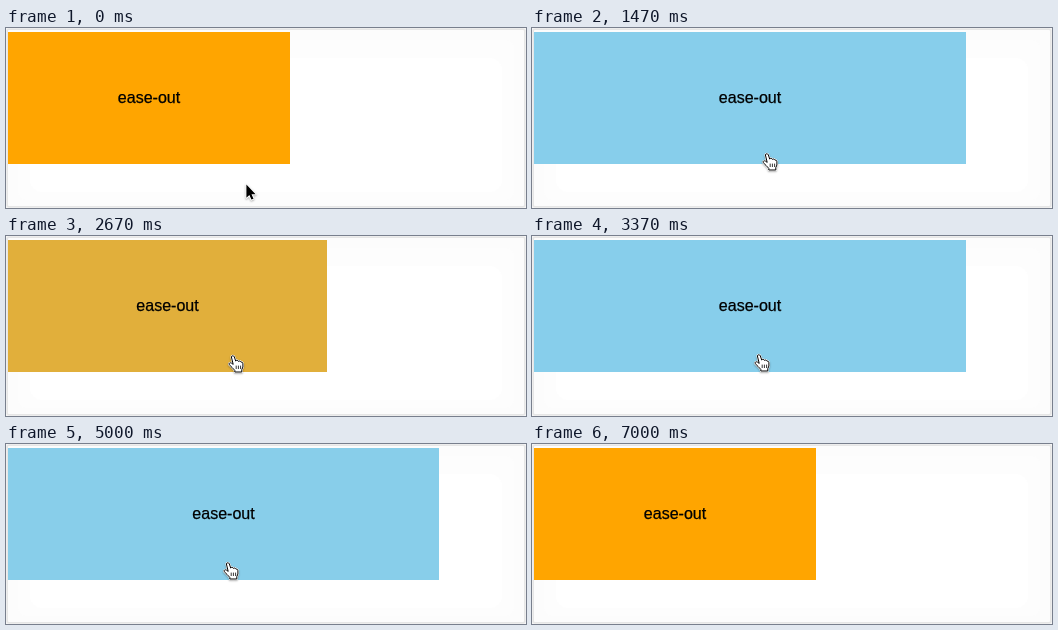
Animation of 520 by 180 pixels, one loop 7.16 s. Source, as an HTML page with a canvas:

```html
<!DOCTYPE html>
<html lang="en">
<head>
<meta charset="utf-8">
<title>ease-out</title>
<style>
html, body { margin: 0; width: 100%; height: 100%; overflow: hidden; background: #fff; }
canvas { display: block; width: 520px; height: 180px; }
</style>
</head>
<body>
<canvas id="stage"></canvas>
<script>
const LOOP = 7160, STEP = 100 / 3, FADE = 500, GLIDE = 220;
const BOX = { x: 2, y: 4, h: 132, small: 282, large: 432 };
const ORANGE = [255, 165, 0], SKY = [135, 206, 235];

// Each visit: when the pointer enters and leaves, where it hovers, where it rests after
const visits = [
  { enter: 507, leave: 1567, hover: [235, 126], rest: [233, 145] },
  { enter: 2587, leave: 3537, hover: [227, 119], rest: [227, 150] },
  { enter: 4529, leave: 5667, hover: [222, 119], rest: [220, 149] }
];
const HOME = [240, 156];
const EXIT = { at: 5900, length: 530, to: [222, 190] };

const canvas = document.getElementById('stage');
const ctx = canvas.getContext('2d');
const ratio = window.devicePixelRatio || 1;
canvas.width = 520 * ratio;
canvas.height = 180 * ratio;
ctx.scale(ratio, ratio);

const mix = (a, b, p) => a + (b - a) * p;
const clamp = p => Math.min(1, Math.max(0, p));
const smooth = p => p * p * (3 - 2 * p);

// cubic-bezier(0, 0, .58, 1), solved by bisection
function easeOut(x) {
  if (x <= 0 || x >= 1) return clamp(x);
  let lo = 0, hi = 1;
  for (let i = 0; i < 24; i++) {
    const s = (lo + hi) / 2;
    if (1.74 * s * s - 0.74 * s ** 3 < x) lo = s; else hi = s;
  }
  return smooth(lo);
}

// Only one visit is active at a time, so their shares add up
const growth = t => visits.reduce((sum, v) =>
  sum + easeOut((t - v.enter) / FADE) - easeOut((t - v.leave) / FADE), 0);

const isInside = t => visits.some(v => t >= v.enter && t < v.leave);

function pointerAt(t) {
  let spot = HOME;
  const glide = (to, start, length) => {
    const p = smooth(clamp((t - start) / length));
    spot = spot.map((c, i) => mix(c, to[i], p));
  };
  for (const v of visits) {
    glide(v.hover, v.enter - GLIDE / 2, GLIDE);
    glide(v.rest, v.leave - GLIDE / 2, GLIDE);
  }
  glide(EXIT.to, EXIT.at, EXIT.length);
  return spot.map(Math.round);
}

function roundRect(x, y, w, h, r, color) {
  ctx.fillStyle = color;
  ctx.beginPath();
  ctx.roundRect(x, y, w, h, r);
  ctx.fill();
}

function drawPage() {
  ctx.fillStyle = '#f6f6f6';
  ctx.fillRect(0, 0, 520, 180);
  roundRect(0.5, 0.5, 519, 179, 2, '#e6e6e6');
  roundRect(2, 2, 516, 176, 1, '#fcfcfc');
  roundRect(12, 12, 496, 160, 8, '#fdfdfd');
  roundRect(24, 30, 472, 134, 12, '#fff');
}

function drawBox(p) {
  const w = Math.round(mix(BOX.small, BOX.large, p));
  const rgb = ORANGE.map((c, i) => Math.round(mix(c, SKY[i], p)));
  ctx.fillStyle = `rgb(${rgb})`;
  ctx.fillRect(BOX.x, BOX.y, w, BOX.h);

  // The hairline stroke gives the slightly heavier screen weight
  ctx.fillStyle = ctx.strokeStyle = '#000';
  ctx.lineWidth = 0.25;
  ctx.font = '16px "Liberation Sans", Helvetica, Arial, sans-serif';
  ctx.textAlign = 'center';
  ctx.fillText('ease-out', BOX.x + w / 2, 75);
  ctx.strokeText('ease-out', BOX.x + w / 2, 75);
}

const arrow = new Path2D('M.4 .6V13.8L3.4 11L5.4 15.6L7.5 14.7L5.5 10.2H9.6Z');
const hand = new Path2D(
  'M-1.6 1C-1.6 -.5 .8 -.7 1.3 .8L2.7 5C3.3 4 5 4.2 5.4 5.4' +
  'C6.2 4.7 7.6 5 8 6.2C9 5.8 9.9 6.6 9.9 7.8V11L8.8 13.6V16H1.8V14.4' +
  'L-1 11.4L-3.8 8.6C-4.5 7.2 -2.8 6.2 -1.4 7.2L.2 8.4Z');
const fingers = new Path2D('M3.2 9.6V13M5.4 9.6V13M7.6 9.6V13');

function drawPointer([x, y], inside) {
  const shape = inside ? hand : arrow;
  ctx.save();
  ctx.translate(x, y);
  ctx.lineJoin = 'round';
  ctx.shadowColor = 'rgba(0,0,0,.3)';
  ctx.shadowBlur = 2 * ratio;
  ctx.shadowOffsetY = ratio;
  ctx.strokeStyle = '#fff';
  ctx.lineWidth = 2;
  ctx.stroke(shape);
  ctx.shadowColor = 'transparent';
  ctx.fillStyle = inside ? '#fff' : '#000';
  ctx.fill(shape);
  if (inside) {
    ctx.strokeStyle = '#000';
    ctx.lineWidth = 1;
    ctx.stroke(shape);
    ctx.lineWidth = 0.8;
    ctx.stroke(fingers);
  }
  ctx.restore();
}

function draw(now) {
  // The picture advances 30 times a second
  const t = Math.floor((now % LOOP + 4) / STEP) * STEP;
  drawPage();
  drawBox(growth(t));
  if (t < EXIT.at + EXIT.length) drawPointer(pointerAt(t), isInside(t));
}

let start = null;
function tick(now) {
  if (start === null) start = now;
  draw(now - start);
  requestAnimationFrame(tick);
}
draw(0);
requestAnimationFrame(tick);
</script>
</body>
</html>
```
